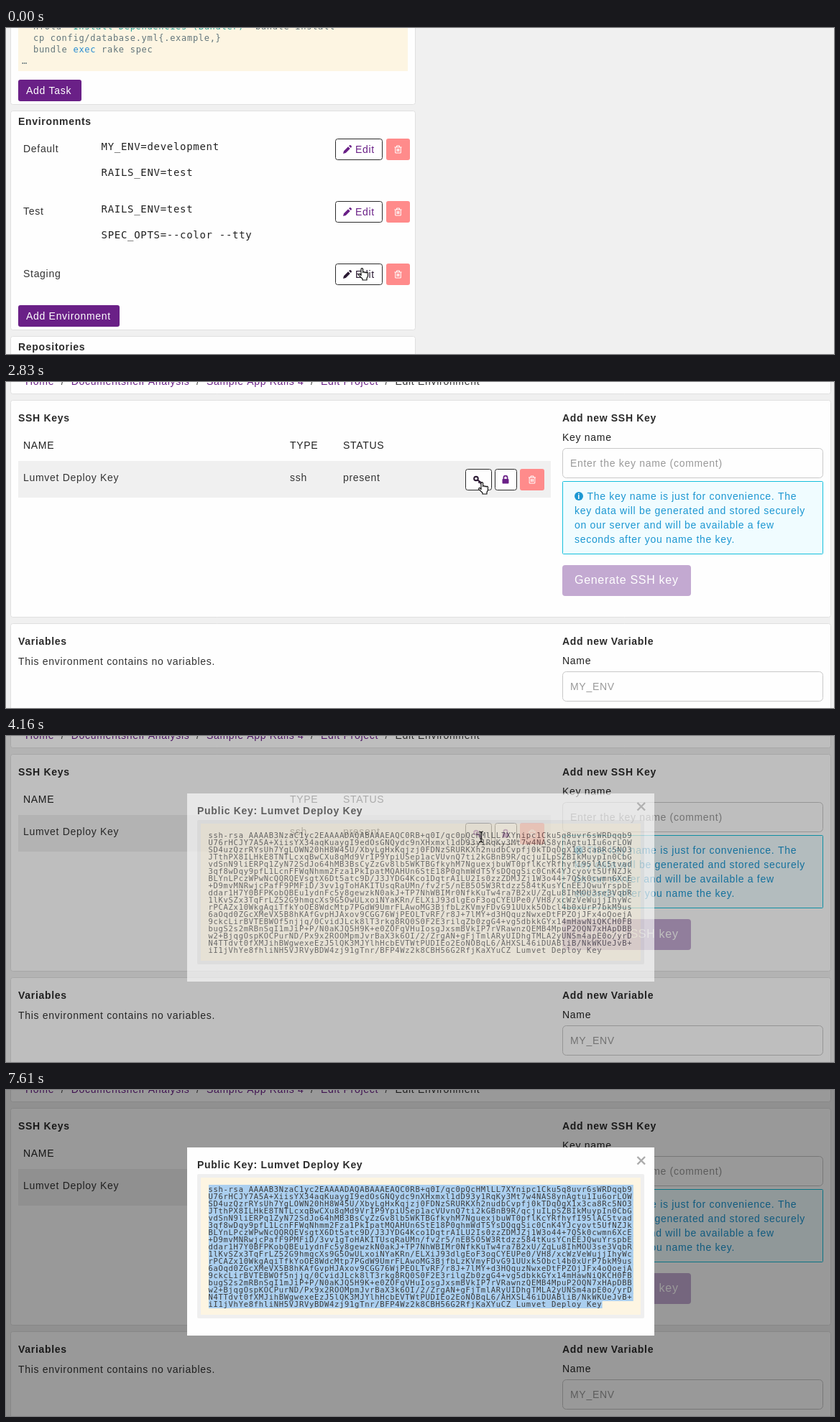
An HTML page with a canvas that plays this animation: 1152 by 454 pixels, repeating every 8.2 s.

```html
<!DOCTYPE html>
<html lang="en">
<head>
<meta charset="utf-8">
<title>Deploy key</title>
<style>
html, body { margin: 0; width: 100%; height: 100%; overflow: hidden; background: #f0f0f0; }
canvas { display: block; }
</style>
</head>
<body>
<canvas id="stage" width="1152" height="454"></canvas>
<script>
const W = 1152, H = 454, LOOP = 8200;
const stage = document.getElementById('stage').getContext('2d');
const sheet = document.createElement('canvas');
sheet.width = W;
sheet.height = H;
const modalLayer = sheet.getContext('2d');
let g = stage;

const SANS = '"Liberation Sans", Arial, sans-serif';
const MONO = '"DejaVu Sans Mono", monospace';
const INK = '#333', PURPLE = '#6a2087', PALE = '#c3a9d1', CREAM = '#fdf5e2', BG = '#f0f0f0';
const KEY_NAME = 'Lumvet Deploy Key';
const KEY_TEXT = [
  'ssh-rsa AAAAB3NzaC1yc2EAAAADAQABAAAEAQC0RB+q0I/qc0pQcHMlLL7XYnipc1Cku5q8uvr6sWRDqqb9',
  'U76rHCJY7A5A+XiisYX34aqKuaygI9edOsGNQydc9nXHxmxl1dD93y1RqKy3Mt7w4NAS8ynAgtu1Iu6orLOW',
  'SD4uzQzrRYsUh7YgLOWN20hH8W45U/XbyLgHxKqjzj0FDNzSRURKXh2nudbCvpfj0kTDqOgX1x3ca8Rc5NO3',
  'JTthPX8ILHkE8TNTLcxqBwCXu8qMd9VrIP9YpiUSep1acVUvnQ7ti2kGBnB9R/qcjuILpSZBIkMuypIn0CbG',
  'vdSnN9liERPq1ZyN72SdJo64hMB3BsCyZzGv8lb5WKTBGfkyhM7NguexjbuWT0pflKcYRfhyfI95lAC5tvad',
  '3qf8wDqy9pfL1LcnFFWqNhmm2Fza1PkIpatMQAHUn6StE18P0qhmWdT5YsDQqgSic0CnK4YJcyovt5UfNZJk',
  'BLYnLPczWPwNcQQRQEVsgtX6Dt5atc9D/J3JYDG4Kco1DqtrA1LU2Is0zzZDMJZj1W3o44+7QSk0cwmn6XcE',
  '+D9mvMNRwjcPafF9PMFiD/3vv1gToHAKITUsqRaUMn/fv2r5/nEB5O5W3Rtdzz584tKusYCnEEJQwuYrspbE',
  'ddar1H7Y0BFPKobQBEu1ydnFc5y8gewzkN0akJ+TP7NhWBIMr0NfkKuTw4ra7B2xU/ZqLu8IhMOU3se3VqbR',
  '1lKvSZx3TqFrLZ52G9hmqcXs9G5OwULxoiNYaKRn/ELXiJ93dlgEoF3oqCYEUPe0/VH8/xcWzVeWujjIhyWc',
  'rPCAZx10WkgAqiTfkYoOE8WdcMtp7PGdW9UmrFLAwoMG3BjfbLzKVmyFDvG91UUxk5Obcl4b0xUrP7bkM9us',
  '6aOqd0ZGcXMeVX5B8hKAfGvpHJAxov9CGG76WjPEOLTvRF/r8J+7lMY+d3HQquzNwxeDtFPZOjJFx4oQoejA',
  '9ckcLirBVTEBWOf5njjq/0CvidJLck8lT3rkg8RQ0S0F2E3rilqZb0zgG4+vg5dbkkGYx14mHawNiQKCH0FB',
  'bugS2s2mRBnSqI1mJiP+P/N0aKJQ5H9K+e0ZOFqVHuIosgJxsmBVkIP7rVRawnzQEMB4MpuP2OQN7xHApDBB',
  'w2+BjqgOspKOCPurND/Px9x2ROOMpmJvrBaX3k6OI/2/ZrgAN+gFjTmlARyUIDhgTMLA2yUNSm4apE0o/yrD',
  'N4TTdvt0fXMJihBWgwexeEzJ5lQK3MJYlhHcbEVTWtPUDIEo2EoNOBqL6/AHXSL46iDUABliB/NkWKUeJvB+',
  'iI1jVhYe8fhliNH5VJRVyBDW4zj91gTnr/BFP4Wz2k8CBH56G2RfjKaXYuCZ ' + KEY_NAME
];
const CHAR = 10.5 * 0.602 + 0.7;

// Timelines: [start, value...]; each entry holds until the next one.
const SCROLL = [[440, 457], [1340, 388], [1490, 206], [1640, 84], [1790, 28], [1940, 9], [2090, 1], [2230, 0]];
const FADE = [[0, 0], [4020, 0.3], [4160, 0.64], [4310, 0.975], [5060, 1]];
const SELECT = [[0, 'none'], [5060, 'word'], [5360, 'all']];
const POINTER = [
  [0, 'hand', 490, 334], [290, 'arrow', 493, 334], [1040, 'arrow', 596, 276], [1190, 'arrow', 604, 269],
  [2380, 'arrow', 662, 183], [2530, 'arrow', 668, 173], [2680, 'hand', 657, 139],
  [3870, 'beam', 661, 133], [7310, 'beam', 672, 137], [7460, 'arrow', 979, 392], [7610, 'none', 0, 0]
];
const at = (line, t) => line.reduce((found, e) => e[0] <= t ? e : found, line[0]);

const HAND = new Path2D('M4 10.5V2a1.3 1.3 0 0 1 2.6 0V6.6a1.2 1.2 0 0 1 2.4.2a1.2 1.2 0 0 1 2.3.4a1.1 1.1 0 0 1 2.2.6V11.5L12 14.5V17H6V15.2L1 10.6a1.2 1.2 0 0 1 1.7-1.7z');
const ARROW = new Path2D('M0 0V14.2L3.2 11.3L5.4 16.4L7.8 15.4L5.7 10.4H10.2z');
const PENCIL = new Path2D('M-6 6L-5 2.2L1-3.8L3.8-1L-2.2 5zM2-4.8L3.4-6Q4.2-6.2 5-5.4L5.8-4.4Q6.2-3.6 5.6-3L4.8-2z');
const TRASH = new Path2D('M-5-3H5M-2-3V-5H2V-3M-3.8-3V5H3.8V-3M-1.5-1V3M0-1V3M1.5-1V3');

function text(s, x, y, color = INK, size = 14, weight = '', family = SANS) {
  g.font = `${weight} ${size}px ${family}`;
  g.letterSpacing = '0.7px';
  g.fillStyle = color;
  g.fillText(s, x, y);
}
const bold = (s, x, y) => text(s, x, y, '#2b2b2b', 14, 'bold');
const mono = (s, x, y, color, size) => text(s, x, y, color, size, '', MONO);

function rect(x, y, x2, y2, color) {
  g.fillStyle = color;
  g.fillRect(x, y, x2 - x, y2 - y);
}

function box(x, y, x2, y2, r, fill, line) {
  const e = line ? 0.5 : 0;
  g.beginPath();
  g.roundRect(x + e, y + e, x2 - x - 2 * e, y2 - y - 2 * e, r);
  g.fillStyle = fill;
  g.fill();
  if (line) {
    g.lineWidth = 1;
    g.strokeStyle = line;
    g.stroke();
  }
}
const panel = (y, x2, y2) => box(6, y - 1, x2 + 1, y2 + 1, 3, '#fefefe', '#e0e0e0');

function place(x, y, draw) {
  g.save();
  g.translate(x, y);
  draw();
  g.restore();
}

function trash(x, y, x2) {
  box(x, y, x2, y + 30, 3, '#ff8b8b');
  place((x + x2) / 2, y + 15, () => {
    g.strokeStyle = '#fff';
    g.lineWidth = 1;
    g.stroke(TRASH);
  });
}

function editButton(y, color) {
  box(458, y, 524, y + 30, 3, '#fff', '#2b2b2b');
  place(475, y + 15, () => {
    g.fillStyle = color;
    g.fill(PENCIL);
  });
  text('Edit', 486, y + 20, color);
  trash(529, y, 562);
}

function button(y, x2, label) {
  box(774, y, x2, y + 43, 4, PALE);
  text(label, 791, y + 26, '#fff', 16);
}

function field(y, label, hint) {
  text(label, 774, y - 10, '#222');
  box(774, y, 1137, y + 42, 5, '#fefefe', '#c8c8c8');
  text(hint, 785, y + 26, '#999');
}

function projectPage() {
  panel(-20, 569, 106);
  rect(17, 0, 559, 60, CREAM);
  const code = '#62757b';
  mono('hfold', 38, 2, code, 12);
  mono('"Install Dependencies (Bundler)"', 85.5, 2, '#2aa198', 12);
  mono('bundle install', 346.9, 2, code, 12);
  mono('cp config/database.yml{.example,}', 38, 18, code, 12);
  mono('bundle      rake spec', 38, 34, code, 12);
  mono('exec', 93.5, 34, '#268bd2', 12);
  mono('…', 22, 50, code, 12);
  box(17, 72, 105, 102, 3, PURPLE);
  text('Add Task', 28, 92, '#fff');

  panel(116, 569, 420);
  bold('Environments', 17, 135);
  [['Default', 'MY_ENV=development', 'RAILS_ENV=test'], ['Test', 'RAILS_ENV=test', 'SPEC_OPTS=--color --tty'], ['Staging', '', '']]
    .forEach(([name, a, b], i) => {
      const y = 154 + 87 * i;
      text(name, 24, y + 19);
      mono(a, 132.5, y + 16, '#222', 14);
      mono(b, 132.5, y + 52, '#222', 14);
      editButton(y, i === 2 ? '#2b1a33' : PURPLE);
    });
  box(17, 386, 158, 416, 3, PURPLE);
  text('Add Environment', 28, 406, '#fff');

  panel(430, 569, 500);
  bold('Repositories', 17, 449);
}

function breadcrumb() {
  const parts = ['Home', 'Documentshelf Analysis', 'Sample App Rails 4', 'Edit Project', 'Edit Environment'];
  let x = 27;
  parts.forEach((part, i) => {
    const last = i === parts.length - 1;
    text(part, x, 4, last ? INK : PURPLE);
    x += g.measureText(part).width + 9.5;
    if (!last) text('/', x, 4, '#444');
    x += 14;
  });
}

function keyIcon(color) {
  place(656, 136, () => {
    g.strokeStyle = color;
    g.lineWidth = 2;
    g.beginPath();
    g.arc(-2, -1.5, 2.8, 0, 7);
    g.moveTo(0, 0.4);
    g.lineTo(5.8, 4.8);
    g.moveTo(3, 2.8);
    g.lineTo(1.6, 4.6);
    g.moveTo(5, 4.2);
    g.lineTo(3.8, 5.8);
    g.stroke();
  });
}

function lockIcon() {
  box(690.5, 135, 699.5, 141.5, 1, PURPLE);
  g.strokeStyle = PURPLE;
  g.lineWidth = 1.7;
  g.beginPath();
  g.moveTo(692.4, 136);
  g.lineTo(692.4, 133.2);
  g.arc(695, 133.2, 2.6, Math.PI, 0);
  g.lineTo(697.6, 136);
  g.stroke();
}

function environmentPage(t) {
  panel(-40, 1147, 16);
  breadcrumb();

  panel(26, 1147, 327);
  bold('SSH Keys', 17, 55);
  text('NAME', 24, 93, '#222');
  text('TYPE', 395, 93, '#222');
  text('STATUS', 469, 93, '#222');
  rect(17, 110, 758, 161, BG);
  text(KEY_NAME, 24, 138);
  text('ssh', 395, 138);
  text('present', 469, 138);
  box(639, 121, 676, 151, 3, t < 3870 ? '#fefefe' : '#ececec', '#2b2b2b');
  box(680, 121, 711, 151, 3, '#fefefe', '#2b2b2b');
  keyIcon(t >= 2830 && t < 3870 ? '#2b1a33' : PURPLE);
  lockIcon();
  trash(715, 121, 749);

  bold('Add new SSH Key', 774, 55);
  field(92, 'Key name', 'Enter the key name (comment)');
  box(774, 138, 1137, 240, 1, '#f0fcff', '#14bfdc');
  const blue = '#1c97d2';
  g.fillStyle = blue;
  g.beginPath();
  g.arc(797, 159, 6, 0, 7);
  g.fill();
  text('i', 795.2, 163, '#fff', 11, 'bold');
  text('The key name is just for convenience. The', 808.5, 164, blue);
  ['key data will be generated and stored securely', 'on our server and will be available a few', 'seconds after you name the key.']
    .forEach((s, i) => text(s, 791, 184 + 20 * i, blue));
  button(255, 953, 'Generate SSH key');

  panel(337, 1147, 614);
  bold('Variables', 17, 366);
  text('This environment contains no variables.', 17, 394);
  bold('Add new Variable', 774, 366);
  field(403, 'Name', 'MY_ENV');
  field(485, 'Value', 'development');
  button(542, 917, 'Save Variable');

  panel(624, 1147, 901);
  bold('Secrets', 17, 653);
  text('This environment contains no secrets.', 17, 681);
  bold('Add new Secret', 774, 653);
  field(690, 'Name', 'AWS_ACCESS_KEY');
  field(772, 'Value', 'AKIAAAAAABBBB');
  button(829, 934, 'Generate Secret');
}

function highlight(mode) {
  const mark = (row, from, to) =>
    rect(282 + from * CHAR, 132 + 10 * row, 282 + to * CHAR + (to === 84 ? 1 : 0), 144 + 10 * row, '#abcfef');
  if (mode === 'word') {
    mark(0, KEY_TEXT[0].indexOf('/') + 1, 84);
    mark(1, 0, KEY_TEXT[1].indexOf('+'));
  } else if (mode === 'all') {
    KEY_TEXT.forEach((s, i) => mark(i, 0, i < 16 ? 84 : s.length));
  }
}

function modal(mode) {
  rect(252, 80, 902, 342, '#fefefe');
  bold('Public Key: ' + KEY_NAME, 266, 109);
  g.strokeStyle = '#aaa';
  g.lineWidth = 2.4;
  g.beginPath();
  g.moveTo(878.5, 93);
  g.lineTo(889, 103.5);
  g.moveTo(889, 93);
  g.lineTo(878.5, 103.5);
  g.stroke();
  box(266, 117, 888, 318, 2, '#efefef');
  rect(271, 122, 883, 313, CREAM);
  highlight(mode);
  KEY_TEXT.forEach((s, i) => mono(s, 281.5, 142 + 10 * i, '#3a3a3a', 10.5));
}

function pointer(kind, x, y) {
  if (kind === 'none') return;
  place(x, y, () => {
    g.lineJoin = 'round';
    if (kind === 'hand') {
      g.fillStyle = '#fff';
      g.fill(HAND);
      g.strokeStyle = '#111';
      g.lineWidth = 1.2;
      g.stroke(HAND);
    } else if (kind === 'arrow') {
      g.shadowColor = 'rgba(0,0,0,.35)';
      g.shadowBlur = 2;
      g.shadowOffsetY = 1;
      g.strokeStyle = '#fff';
      g.lineWidth = 2;
      g.stroke(ARROW);
      g.shadowColor = 'transparent';
      g.fillStyle = '#000';
      g.fill(ARROW);
    } else {
      g.strokeStyle = '#111';
      g.lineWidth = 1.2;
      g.beginPath();
      g.moveTo(-3, 0);
      g.quadraticCurveTo(0, 0, 0, 2);
      g.quadraticCurveTo(0, 0, 3, 0);
      g.moveTo(0, 2);
      g.lineTo(0, 13);
      g.moveTo(-3, 15);
      g.quadraticCurveTo(0, 15, 0, 13);
      g.quadraticCurveTo(0, 15, 3, 15);
      g.moveTo(-2, 10);
      g.lineTo(2, 10);
      g.stroke();
    }
  });
}

function draw(t) {
  g = stage;
  rect(0, 0, W, H, BG);
  if (t < 440) projectPage();
  else place(0, -at(SCROLL, t)[1], () => environmentPage(t));

  const fade = at(FADE, t)[1];
  if (fade > 0) {
    rect(0, 0, W, H, `rgba(0,0,0,${0.4 * fade})`);
    g = modalLayer;
    g.clearRect(0, 0, W, H);
    modal(at(SELECT, t)[1]);
    g = stage;
    g.globalAlpha = fade;
    g.drawImage(sheet, 0, 0);
    g.globalAlpha = 1;
  }
  pointer(...at(POINTER, t).slice(1));
}

const start = performance.now();
function tick() {
  draw((performance.now() - start) % LOOP);
  requestAnimationFrame(tick);
}
tick();
</script>
</body>
</html>
```
